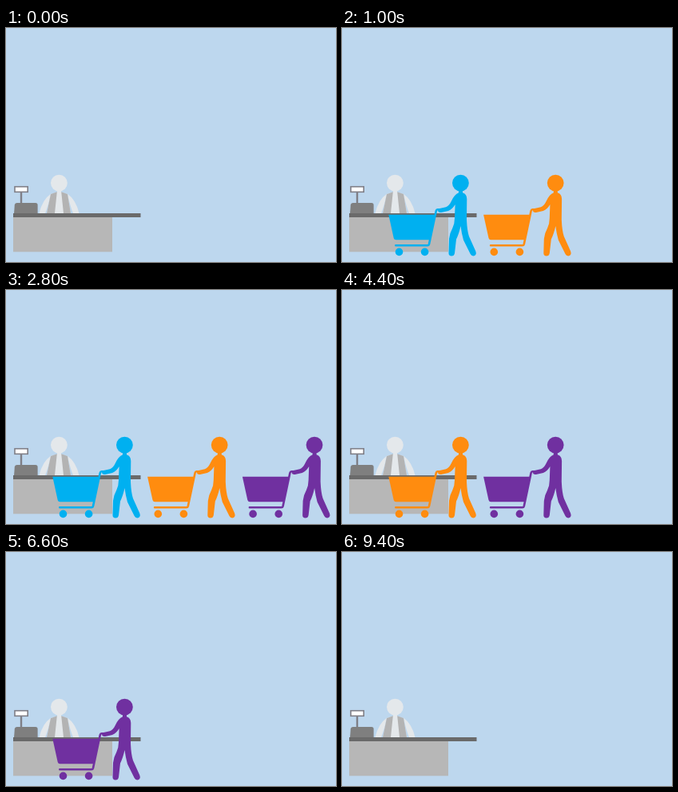
Recreate the animation shown at these times as an HTML page. Size 413 px wide and 293 px high, loop 9.6 s.

```html
<!DOCTYPE html>
<html lang="en">
<head>
<meta charset="utf-8">
<title>Checkout queue</title>
<style>
  html, body { margin: 0; width: 100%; height: 100%; overflow: hidden; background: #bdd7ee; }
  svg { display: block; width: 100vw; height: 100vh; }
</style>
</head>
<body>
<svg viewBox="0 0 413 293">
  <defs>
    <g id="shopper">
      <circle cx="148.4" cy="194.1" r="10.4"/>
      <path d="M146 203.5H151V206.3Q156.2 208 156.3 214L156 240Q156.6 254 159 261L167.3 279.5Q168.8 284 165.4 285.3Q162.2 286 160.7 283L152 265.5Q149.8 258 148.5 248Q146.3 258 143 264.5L141 282Q140.4 285.5 137 285.5Q133.5 285.3 133.5 282L134 264Q134.7 257 138.3 250.5Q141 245 141 238L141.6 221Q138 227 133 229L124 231Q120.5 231.3 120 229L121 226.3L130 224.2Q134 222.8 136.5 217.5Q140.5 208.5 146 206.3Z"/>
      <path d="M58.3 233.8H117.3L110.2 265.2H67.5Q65.3 265.2 64.7 263Z"/>
      <path d="M125 227.2H119.6Q118.2 227.2 117.8 229L109 270.6Q108.6 272.3 107 272.3H67.3" fill="none" stroke="currentColor" stroke-width="2.6" stroke-linecap="round"/>
      <circle cx="71.5" cy="280.4" r="4.8"/>
      <circle cx="103.6" cy="280.4" r="4.8"/>
    </g>
  </defs>

  <rect width="413" height="293" fill="#bdd7ee"/>

  <!-- cashier -->
  <g fill="#e4e8eb">
    <circle cx="66.4" cy="194.1" r="10.4"/>
    <path d="M64 203H69V205.5L77 208L81 232H51L56 208L64 205.5Z"/>
    <path d="M56 207.8Q45.5 215 41.5 232H49Q53 222 56 207.8Z"/>
    <path d="M77 207.8Q87.5 215 91.5 232H84Q80 222 77 207.8Z"/>
  </g>
  <path d="M56 208L63.8 205.3L61 232H51ZM77 208L69.2 205.3L72 232H81Z" fill="#b3b3b3"/>

  <!-- till and counter -->
  <rect x="17.8" y="205" width="2.4" height="15" fill="#7f7f87"/>
  <rect x="11" y="198.7" width="16.2" height="6.6" fill="#fff" stroke="#7f7f87" stroke-width="1.6"/>
  <path d="M10 233L10.8 221.5Q11 219 13.5 219H37Q39.6 219 39.6 221.5V233Z" fill="#7f7f7f"/>
  <rect x="9" y="237" width="124" height="43.3" fill="#b7b7b7"/>
  <rect x="9" y="232" width="159.5" height="5" fill="#6a6a6a"/>

  <g id="queue"></g>
</svg>
<script>
  const LOOP = 9600, GAP = 118.8;

  // each step: time (ms) and queue place of that shopper, -1 when away
  const shoppers = [
    { color: '#00b0f0', steps: [[0, -1], [200, 0], [4400, -1]] },
    { color: '#ff8c0f', steps: [[0, -1], [1000, 1], [4400, 0], [6600, -1]] },
    { color: '#7030a0', steps: [[0, -1], [2400, 2], [4400, 1], [6600, 0], [8600, -1]] }
  ];

  const queue = document.getElementById('queue');
  for (const s of shoppers) {
    s.el = document.createElementNS('http://www.w3.org/2000/svg', 'use');
    s.el.setAttribute('href', '#shopper');
    s.el.setAttribute('fill', s.color);
    s.el.setAttribute('color', s.color);
    queue.append(s.el);
  }

  function draw(t) {
    for (const { el, steps } of shoppers) {
      const place = steps.filter(([at]) => at <= t).pop()[1];
      el.style.display = place < 0 ? 'none' : '';
      el.setAttribute('x', Math.max(place, 0) * GAP);
    }
  }

  const start = performance.now();
  function tick() {
    draw((performance.now() - start) % LOOP);
    requestAnimationFrame(tick);
  }
  tick();
</script>
</body>
</html>
```
